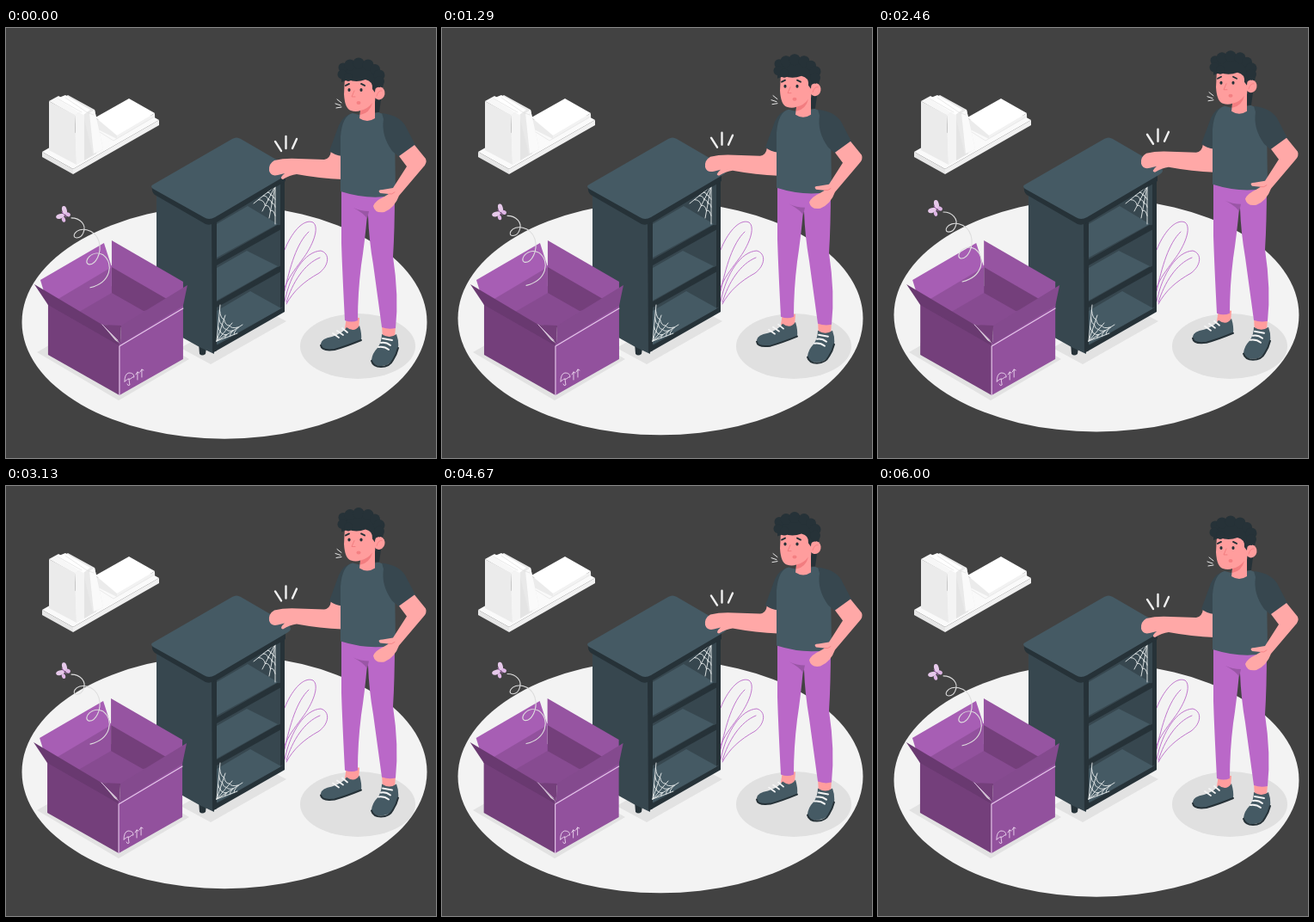
These frames come from a looping animation (500x500 px, 6040 ms). An HTML page with a canvas:

```html
<!DOCTYPE html>
<html lang="en">
<head>
<meta charset="utf-8">
<title>Empty bookcase</title>
<style>
html, body { margin: 0; width: 100%; height: 100%; overflow: hidden; background: #424242; }
canvas { display: block; width: 500px; height: 500px; }
</style>
</head>
<body>
<canvas id="stage"></canvas>
<script>
const canvas = document.getElementById('stage');
const ratio = window.devicePixelRatio || 1;
canvas.width = canvas.height = 500 * ratio;
const ctx = canvas.getContext('2d');
ctx.lineCap = ctx.lineJoin = 'round';

const LOOP = 6040, LEAD = 12;
const DARK = '#263238', SLATE = '#37474f', STEEL = '#455a64';
const PURPLE = '#ba68c8', SKIN = '#ff9d9d', ARM = '#ffa8a7', SKIN_SHADE = '#f27d80';

const paths = {};
const path = d => paths[d] || (paths[d] = new Path2D(d));

function fill(color, d) {
  ctx.fillStyle = color;
  ctx.fill(path(d));
}

function line(color, width, d) {
  ctx.strokeStyle = color;
  ctx.lineWidth = width;
  ctx.stroke(path(d));
}

function oval(color, x, y, rx, ry = rx, turn = 0) {
  ctx.fillStyle = color;
  ctx.beginPath();
  ctx.ellipse(x, y, rx, ry, turn, 0, Math.PI * 2);
  ctx.fill();
}

function shifted(x, y, draw) {
  ctx.save();
  ctx.translate(x, y);
  draw();
  ctx.restore();
}

// Rises 10px and returns once per period.
const float = (t, period) => -10 * (1 - Math.abs(1 - 2 * (t % period) / period));

// Sideways shake through evenly spaced stops.
const STOPS = [0, -1, 2, -4, 4, -4, 4, -4, 2, -1, 0];
function shake(t, period) {
  const p = (t % period) / period * 10, i = Math.floor(p);
  return STOPS[i] + (STOPS[i + 1] - STOPS[i]) * (p - i);
}

function shadows() {
  fill('#e2e2e2', 'M36 377 L118 330 L213 385 L131 433Z');
  fill('#e2e2e2', 'M203 372 L290 322 L326 341 L238 391Z');
  oval('#e0e0e0', 409, 370, 67, 38);
}

function books() {
  fill('#fafafa', 'M42 144 L142 87 L178 107 L78 164Z');
  fill('#e6e6e6', 'M42 144 L78 164 L78 170 L42 150Z');
  fill('#f0f0f0', 'M78 164 L178 107 L178 113 L78 170Z');
  fill('#fff', 'M104 104 L143 82 L173 99 L129 125Z');
  fill('#ebebeb', 'M104 104 L129 125 L129 129 L107 118Z');
  fill('#f2f2f2', 'M129 125 L173 99 L173 106 L129 131Z');
  fill('#fafafa', 'M109 121 L125 131 L173 103 L173 108 L125 136 L109 127Z');
  line('#e0e0e0', .6, 'M109 121 L125 131 L173 103');
  fill('#e4e4e4', 'M88 93 L99 99 L105 146 L91 154Z');
  fill('#e9e9e9', 'M68 80 L72 78 L103 95 L113 141 L101 147 L90 102Z');
  fill('#fafafa', 'M97 99 L103 95 L113 141 L102 146Z');
  fill('#f7f7f7', 'M50 85 L61 79 L91 95 L80 102Z');
  fill('#ebebeb', 'M50 85 L80 101 L82 159 L50 142Z');
  fill('#f4f4f4', 'M80 101 L91 95 L91 154 L82 159Z');
  fill('#fff', 'M59 82 L69 78 L98 95 L90 101Z');
  line('#dadada', .6, 'M60 82 L88 98 M69 81 L94 98 L102 101');
}

function plant() {
  line(PURPLE, .9, 'M324 258 C331 240 345 221 357 226 C365 232 357 253 344 270 C335 282 328 291 324 302');
  line(PURPLE, .9, 'M324 306 C330 278 338 250 352 237');
  line(PURPLE, .9, 'M324 318 C331 284 348 260 366 259 C377 262 376 276 364 285 C346 295 334 306 326 321');
  line(PURPLE, .9, 'M326 319 C333 296 347 274 365 267');
}

function web(x, y, tips, rings) {
  ctx.strokeStyle = '#e9eeee';
  ctx.lineWidth = .9;
  ctx.beginPath();
  for (const [tx, ty] of tips) {
    ctx.moveTo(x, y);
    ctx.lineTo(tx, ty);
  }
  for (const r of rings) {
    tips.forEach(([tx, ty], i) => {
      const px = x + (tx - x) * r, py = y + (ty - y) * r;
      if (!i) return ctx.moveTo(px, py);
      const [ux, uy] = tips[i - 1];
      const mx = (tx + ux) / 2 - x, my = (ty + uy) / 2 - y;
      ctx.quadraticCurveTo(x + mx * r * .82, y + my * r * .82, px, py);
    });
  }
  ctx.stroke();
}

function cabinet() {
  fill(DARK, 'M224 366 L233 372 L232 379 Q228 382 225 379Z');
  fill(SLATE, 'M175 190 L242 222 L242 379 L225 371 L175 343Z');
  fill(DARK, 'M239 222 L324 172 L324 330 L240 378Z');
  fill(SLATE, 'M245 226 L320 181 L320 228 L245 270Z');
  fill(STEEL, 'M245 267 L245 228 L281 207 L316 228Z');
  fill(SLATE, 'M245 276 L320 234 L320 276 L245 319Z');
  fill(STEEL, 'M245 317 L245 279 L280 259 L316 277Z');
  fill(SLATE, 'M245 325 L320 283 L320 326 L245 368Z');
  fill(STEEL, 'M245 368 L245 329 L284 306 L320 326Z');
  line(DARK, 4, 'M244 272 L316 231 M244 321 L316 280 M321 181 L321 328');
  line(DARK, 4, 'M243 228 L243 374');
  line(STEEL, .6, 'M246 368 L321 325');
  web(313, 184, [[313, 228], [306, 221], [298, 213], [288, 204]], [.35, .55, .78]);
  web(245, 364, [[249, 322], [255, 334], [263, 343], [275, 345], [269, 355]], [.4, .65, .85]);
  fill(DARK, 'M170 184 L233 216 L243 214 L325 166 L325 178 L243 226 Q238 230 232 228 L173 194 Q169 191 170 184Z');
  fill(STEEL, 'M171 182 L263 129 Q268 126 273 129 L328 161 Q334 166 328 170 L243 220 Q236 224 230 220 L171 187 Q167 184 171 182Z');
}

function box() {
  fill('#874b91', 'M123 300 L170 330 L134 348 L112 345 L70 330Z');
  fill('#743f7b', 'M123 276 L206 322 L160 329 L123 308Z');
  fill('#92519d', 'M49 320 L123 276 L123 308 L80 333Z');
  fill('#a75eb4', 'M40 293 L114 250 L123 278 L49 322Z');
  fill('#9654a1', 'M123 247 L206 295 L206 326 L123 278Z');
  fill('#743f7b', 'M49 318 L132 366 L132 427 L49 380Z');
  fill('#92519d', 'M132 366 L206 322 L206 385 L132 427Z');
  fill('#693970', 'M33 298 L112 345 L133 370 L49 322Z');
  fill('#844a8e', 'M134 346 L211 299 L206 323 L133 368Z');
  fill('#743f7b', 'M112 345 L134 346 L133 367Z');
  line('#e7c8ec', .8, 'M112 345 L130 363');
  line('#e7c8ec', 1.1, 'M132 427 L132 370 L206 326');
  line('#ecd7ef', .9, 'M138 411 Q138 402 143 401 Q149 401 149 406 Q147 405 145 408 Q142 407 138 411 M143 408 L144 415 Q142 417 141 414');
  line('#ecd7ef', .9, 'M153 409 L153 400 M151 403 L153 400 L155 401 M158 406 L158 397 M156 400 L158 397 L160 398');
}

function butterfly() {
  line('#dedede', 1.1, 'M76 221 C86 221 94 229 90 238 C87 246 76 246 80 239 C85 231 103 233 108 248 C112 262 104 276 96 275 C89 272 100 257 113 264 C126 274 122 296 98 302');
  oval('#e6c8ea', 63, 219, 5, 2.8, -.3);
  oval('#e6c8ea', 68, 212, 2.8, 5, -.25);
  oval('#dfb6e6', 72, 217, 3, 2.3, .5);
  oval('#dfb6e6', 67, 223, 2.1, 3, -.3);
  line('#ba68c8', .9, 'M65 214 L70 220');
}

function legs() {
  fill(SKIN, 'M396 336 L411 337 L410 351 L399 355 L394 349Z');
  fill(SKIN, 'M437 345 L453 346 L452 361 L438 363Z');
  fill(STEEL, 'M411 346 Q414 356 413 363 Q396 370 382 374 Q366 377 366 367 Q367 361 379 359 Q392 355 396 348 Q405 355 411 346Z');
  line(DARK, 2, 'M413 363 Q396 370 382 374 Q367 376 366 369');
  line('#f4f4f4', 1.8, 'M380 355 L387 360 M385 352 L392 357 M391 349 L397 354');
  fill(STEEL, 'M454 356 Q459 370 453 380 Q449 392 437 393 Q425 394 425 386 Q426 378 432 372 Q437 365 437 356 Q446 362 454 356Z');
  line(DARK, 2, 'M456 372 Q454 380 450 386 Q446 394 436 394 Q427 394 425 387');
  line('#f4f4f4', 2, 'M433 371 Q440 370 445 374 M436 366 Q442 365 447 369 M438 361 L449 363');
  fill(PURPLE, 'M390 185 L452 190 Q452 235 450 266 Q457 312 453 349 Q445 351 437 348 L427 275 Q422 246 421 218 L420 218 Q417 250 413 276 Q409 308 409 340 Q402 343 394 340 Q391 282 390 250Z');
  fill('#9a56a6', 'M404 209 Q412 213 422 213 L420 222 Q417 216 404 209Z');
}

function arms() {
  fill(ARM, 'M390 143 L378 143 Q377 152 370 153 L340 152 Q324 151 312 154 Q305 158 306 166 Q308 173 316 171 L324 169 Q317 175 322 176 Q330 171 338 170 Q365 175 391 176Z');
  fill(SLATE, 'M405 99 Q393 100 387 113 L376 143 Q382 148 391 149 L400 130Z');
}

function torso() {
  fill(STEEL, 'M403 99 Q418 104 433 98 Q447 102 452 115 L453 194 Q424 201 389 190 L389 126 Q391 102 403 99Z');
  fill(SLATE, 'M437 99 Q456 101 464 113 L477 138 Q468 148 457 150 L449 143 Q436 125 439 106Z');
  fill(ARM, 'M475 136 L488 152 Q490 157 485 162 L457 195 Q452 209 440 214 Q429 216 427 207 Q429 201 440 196 L445 193 L435 192 Q431 188 438 188 L450 186 L466 161 L457 149Z');
  line(SKIN_SHADE, .8, 'M445 193 Q449 194 452 191');
}

function head() {
  fill(DARK, 'M424 66 L439 64 Q436 82 434 98 L429 98 L427 80Z');
  fill(SKIN, 'M394 57 L393 77 Q394 94 401 96 Q407 98 412 96 L411 105 Q420 111 429 105 L429 86 L431 62 L421 55Z');
  fill(SKIN_SHADE, 'M412 96 Q421 94 426 87 Q423 99 412 101Z');
  oval(SKIN, 434, 76, 6.5, 7.5, .2);
  line(SKIN_SHADE, .8, 'M431 79 Q433 72 437 73');
  fill(DARK, 'M390 63 L390 48 Q402 38 421 40 Q436 45 439 59 L435 69 Q429 67 429 75 L426 71 Q427 62 418 60 Q407 64 398 60Z');
  for (const [x, y, r] of [[392, 46, 5.5], [391, 54, 5.5], [400, 43, 6.5], [410, 41, 6.5], [421, 43, 6.5], [429, 48, 6], [434, 55, 6.5], [434, 62, 6], [398, 57, 5]]) oval(DARK, x, y, r);
  oval(DARK, 399, 72, 1.6, 2);
  oval(DARK, 413, 72, 1.6, 2);
  line(DARK, 1.9, 'M395 67 L399 65 M413 65 L417 67');
  line(SKIN_SHADE, 1, 'M405 73 L402 80 L406 80');
  oval('#f47f82', 410, 87, 2.5, 2);
  line('#e8e8e8', 1, 'M385 83 L390 87 M383 88 L389 90 M384 93 L390 92');
}

function man() {
  legs();
  arms();
  torso();
  head();
  line('#f0f0f0', 2.4, 'M313 132 L320 143 M325.500 126 L325.500 140 M338 129 L333 140');
}

function draw(now) {
  const t = now % LOOP + LEAD;
  const rise = float(t, 6000);
  ctx.setTransform(ratio, 0, 0, ratio, 0, 0);
  ctx.fillStyle = '#424242';
  ctx.fillRect(0, 0, 500, 500);
  oval('#f3f3f3', 254, 342 + rise, 235.5, 135.7);
  shadows();
  books();
  plant();
  cabinet();
  shifted(shake(t, 1500), 0, box);
  shifted(0, float(t, 1500), butterfly);
  shifted(0, rise, man);
}

let start;
function tick(now) {
  if (start === undefined) start = now;
  draw(now - start);
  requestAnimationFrame(tick);
}
draw(0);
requestAnimationFrame(tick);
</script>
</body>
</html>
```
